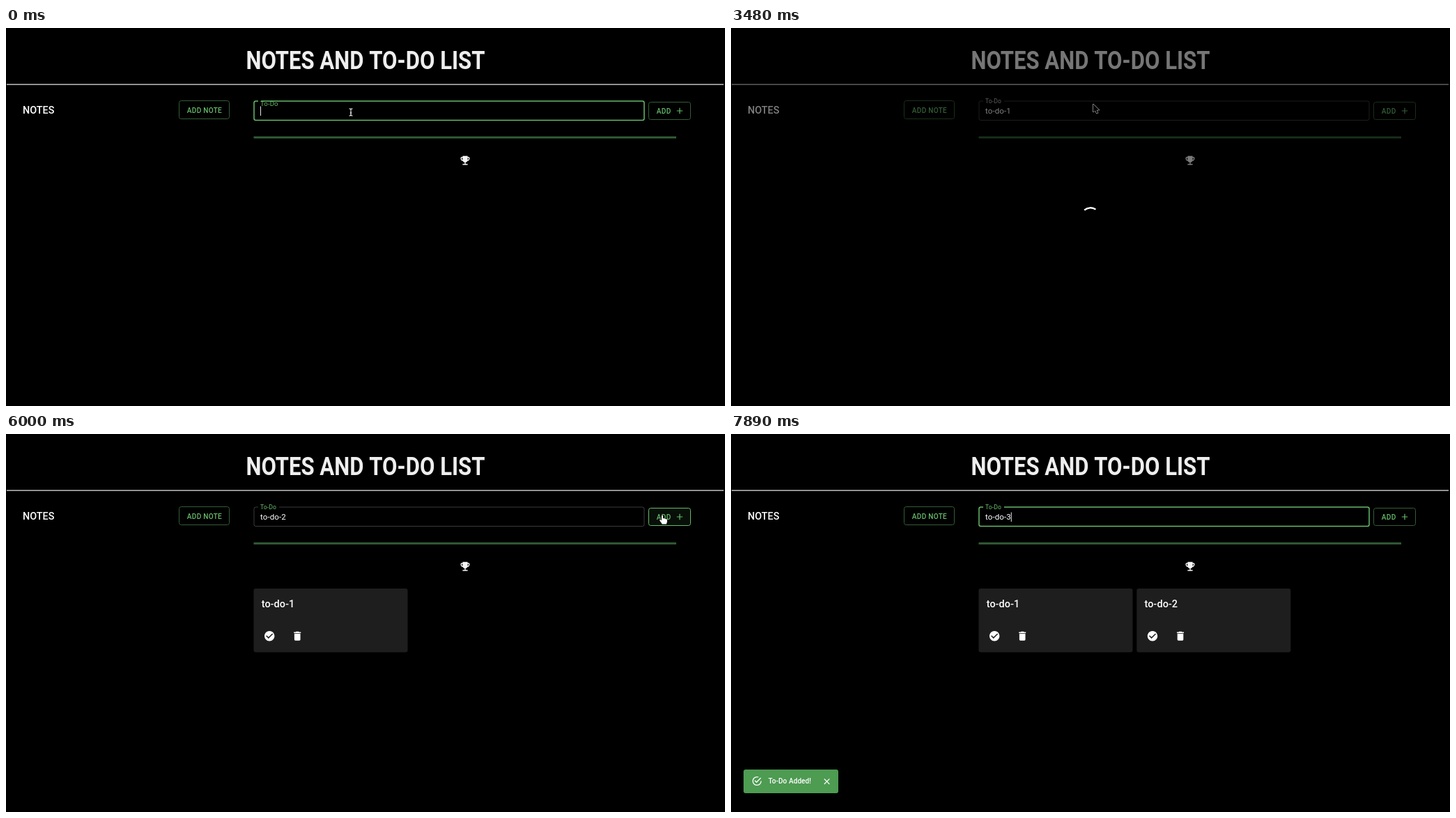
These frames come from a looping animation (1032x543 px, 8 s). An HTML page with a canvas:

```html
<!DOCTYPE html>
<html lang="en">
<head>
<meta charset="utf-8">
<title>Notes and to-do list</title>
<style>
  html, body { margin: 0; width: 100%; height: 100%; overflow: hidden; background: #000; }
  canvas { display: block; }
</style>
</head>
<body>
<canvas id="stage" width="1032" height="543"></canvas>
<script>
const ctx = document.getElementById('stage').getContext('2d');
const LOOP = 8000, GREEN = '#66bb6a', DARK_GREEN = '#335d35';

const ICONS = {
  trophy: 'M19 5h-2V3H7v2H5c-1.1 0-2 .9-2 2v1c0 2.55 1.92 4.63 4.39 4.94.63 1.5 1.98 2.63 3.61 2.96V19H7v2h10v-2h-4v-3.1c1.63-.33 2.98-1.46 3.61-2.96C19.08 12.63 21 10.55 21 8V7c0-1.1-.9-2-2-2zM5 8V7h2v3.82C5.84 10.4 5 9.3 5 8zm14 0c0 1.3-.84 2.4-2 2.82V7h2v1z',
  done: 'M12 2C6.48 2 2 6.48 2 12s4.48 10 10 10 10-4.48 10-10S17.52 2 12 2zm-2 15l-5-5 1.41-1.41L10 14.17l7.59-7.59L19 8l-9 9z',
  bin: 'M6 19c0 1.1.9 2 2 2h8c1.1 0 2-.9 2-2V7H6v12zM19 4h-3.5l-1-1h-5l-1 1H5v2h14V4z',
  plus: 'M19 13h-6v6h-2v-6H5v-2h6V5h2v6h6v2z',
  close: 'M19 6.41L17.59 5 12 10.59 6.41 5 5 6.41 10.59 12 5 17.59 6.41 19 12 13.41 17.59 19 19 17.59 13.41 12z',
  success: 'M20 12A8 8 0 1 1 12 4C12.76 4 13.5 4.11 14.2 4.31L15.77 2.74C14.61 2.26 13.34 2 12 2A10 10 0 1 0 22 12M7.91 10.08L6.5 11.5 11 16 21 6 19.59 4.58 11 13.17z'
};
for (const name in ICONS) ICONS[name] = new Path2D(ICONS[name]);

const ARROW = new Path2D('M0 0V12L2.8 9.5 4.8 14 6.8 13 4.9 8.8H8.6z');
const HAND = new Path2D('M-1 1C-1-.5 1-.5 1 1V4.5C2 3.8 3 4 3.2 4.8 4.2 4.2 5 4.5 5.2 5.4 6.4 5 7 5.6 7 6.6V9C7 10 6 11 6 12.5H-.5C-.5 11-2 10-3.6 7.4-4.3 6.2-2.8 5.4-1.8 6.6L-1 7.4z');
const IBEAM = new Path2D('M-2.5-5H-1L0-4 1-5H2.5M0-4V4M-2.5 5H-1L0 4 1 5H2.5M-1.3 1H1.3');

// [time, field content]
const TYPING = [[0, ''], [810, 't'], [900, 'to'], [990, 'to-'], [1050, 'to-d'], [1140, 'to-do'],
  [1740, 'to-do-'], [1860, 'to-do-1'], [5100, 'to-do-'], [5250, 'to-do-2'],
  [7590, 'to-do-'], [7770, 'to-do-3']];

// [time, x, y] of the pointer's hot spot
const POINTER = [[0, 495, 121], [2070, 495, 121], [2550, 961, 120], [2900, 961, 120], [3400, 520, 109],
  [4500, 520, 109], [4690, 491, 118], [5430, 491, 118], [5850, 942, 117], [6000, 942, 117],
  [6480, 510, 113], [LOOP, 510, 113]];

const within = (t, ...spans) => spans.some(([a, b]) => t >= a && t < b);
const ramp = (t, start, length) => Math.max(0, Math.min(1, (t - start) / length));
const smooth = x => x * x * (3 - 2 * x);
const fade = (t, start, end) => smooth(ramp(t, start, 225)) * (1 - smooth(ramp(t, end, 195)));

function text(str, x, y, size, weight, color, spacing = 0) {
  ctx.font = `${weight} ${size}px Roboto, sans-serif`;
  ctx.letterSpacing = spacing + 'px';
  ctx.fillStyle = color;
  ctx.fillText(str, x, y);
}

function icon(name, x, y, scale, color = '#fff') {
  ctx.save();
  ctx.translate(x, y);
  ctx.scale(scale, scale);
  ctx.translate(-12, -12);
  ctx.fillStyle = color;
  ctx.fill(ICONS[name]);
  ctx.restore();
}

function box(x, y, w, h, fill, stroke) {
  ctx.beginPath();
  ctx.roundRect(x, y, w, h, 2.9);
  if (fill) { ctx.fillStyle = fill; ctx.fill(); }
  if (stroke) { ctx.strokeStyle = stroke; ctx.lineWidth = 1; ctx.stroke(); }
}

function header() {
  ctx.save();
  ctx.translate(516, 59.3);
  ctx.scale(.83, 1);
  ctx.textAlign = 'center';
  text('NOTES AND TO-DO LIST', 0, 0, 37.5, 700, '#eee');
  ctx.restore();
  ctx.fillStyle = '#ccc';
  ctx.fillRect(1, 80.4, 1029, 1.4);
  text('NOTES', 24, 122.6, 14.4, 500, '#fff', .1);
  box(248.5, 104.5, 72, 26, null, DARK_GREEN);
  text('ADD NOTE', 259.8, 121.5, 10.08, 500, GREEN, .29);
}

function field(t, hovered) {
  const focused = within(t, [0, 2880], [4800, 5940], [7380, LOOP]);
  const labelGreen = focused || within(t, [2880, 3000], [5940, 6080]);
  const shrink = ramp(t, 480, 120);
  const gapEnd = 366 + 26 * shrink;
  ctx.beginPath();
  ctx.moveTo(gapEnd, 105);
  ctx.arcTo(916, 105, 916, 132.5, 2.5);
  ctx.arcTo(916, 132.5, 356, 132.5, 2.5);
  ctx.arcTo(356, 132.5, 356, 105, 2.5);
  ctx.arcTo(356, 105, 362, 105, 2.5);
  ctx.lineTo(362, 105);
  ctx.strokeStyle = focused ? GREEN : hovered ? '#fff' : 'rgba(255,255,255,.23)';
  ctx.lineWidth = focused ? 1.5 : 1;
  ctx.stroke();
  text('To-Do', 365, 112.4 - 4.6 * shrink, 9.6 - .96 * shrink, 400, labelGreen ? GREEN : '#b8b8b8', .1);

  const value = TYPING.findLast(([start]) => t >= start)[1];
  text(value, 365, 123, 11.52, 400, '#fff', .1);
  if (within(t, [0, 2360], [4830, 5700], [7410, LOOP])) {
    ctx.fillRect(365 + ctx.measureText(value).width, 112.5, .9, 13.5);
  }
}

function addButton(hovered) {
  box(922.5, 106.5, 60, 25, hovered && 'rgba(102,187,106,.08)', hovered ? GREEN : DARK_GREEN);
  text('ADD', 933.8, 122.7, 10.08, 500, GREEN, .29);
  icon('plus', 967, 119, .6, GREEN);
}

function card(x, title) {
  box(x, 222, 221, 91.5, '#1e1e1e');
  text(title, x + 11.3, 249.4, 14.4, 500, '#fff', .1);
  icon('done', x + 22.7, 290.3, .72);
  icon('bin', x + 62.7, 290.3, .72);
}

// Dashed circle that grows, then shrinks, while the whole ring turns.
function spinner(elapsed) {
  const p = elapsed / 1400 % 1, round = 126.9;
  const grow = smooth(ramp(p, 0, .5)), slide = smooth(ramp(p, .5, .5));
  const from = 15 * grow + 110 * slide;
  const to = Math.min(round, from + 1 + 99 * grow);
  const angle = dash => (p + dash / round) * 2 * Math.PI;
  ctx.beginPath();
  ctx.arc(516, 271.5, 13.2, angle(from), angle(to));
  ctx.strokeStyle = '#fff';
  ctx.lineWidth = 2.4;
  ctx.stroke();
}

function snackbar(amount) {
  if (!amount) return;
  const s = .75 + .25 * amount;
  ctx.save();
  ctx.globalAlpha = amount;
  ctx.translate(86, 499);
  ctx.scale(s, s * s);
  ctx.translate(-86, -499);
  box(18, 482, 136, 34, '#4e9b52');
  icon('success', 37.3, 498.5, .66);
  text('To-Do Added!', 53.6, 502.2, 10.08, 500, '#fff', .05);
  icon('close', 137.6, 499.2, .6);
  ctx.restore();
}

function pointerAt(t) {
  const i = POINTER.findIndex(([end]) => end > t);
  const [t0, x0, y0] = POINTER[i - 1], [t1, x1, y1] = POINTER[i];
  const k = smooth((t - t0) / (t1 - t0));
  return [x0 + (x1 - x0) * k, y0 + (y1 - y0) * k];
}

function drawPointer(x, y, kind) {
  ctx.save();
  ctx.translate(x, y);
  if (kind === 'ibeam') {
    ctx.strokeStyle = '#000';
    ctx.lineWidth = 3;
    ctx.stroke(IBEAM);
    ctx.strokeStyle = '#fff';
    ctx.lineWidth = 1.1;
    ctx.stroke(IBEAM);
  } else {
    const isHand = kind === 'hand', shape = isHand ? HAND : ARROW;
    ctx.fillStyle = isHand ? '#fff' : '#000';
    ctx.strokeStyle = isHand ? '#000' : '#fff';
    ctx.lineWidth = 1;
    ctx.stroke(shape);
    ctx.fill(shape);
  }
  ctx.restore();
}

function draw(t) {
  const [x, y] = pointerAt(t);
  const visible = !within(t, [840, 2070], [5100, 5430], [7530, LOOP]);
  const shade = fade(t, 3000, 3930) + fade(t, 6100, 7000);
  const kind = shade ? 'arrow' : x > 921 ? 'hand' : 'ibeam';

  ctx.fillStyle = '#000';
  ctx.fillRect(0, 0, 1032, 543);
  header();
  field(t, visible && kind === 'ibeam' && within(t, [3930, 4800], [7000, 7380]));
  addButton(visible && kind === 'hand');
  ctx.fillStyle = DARK_GREEN;
  ctx.fillRect(355.5, 155.7, 606.5, 2.9);
  icon('trophy', 659, 190.3, .72, '#f4f4f4');
  if (t >= 3930) card(355.5, 'to-do-1');
  if (t >= 7000) card(582.3, 'to-do-2');

  if (shade) {
    ctx.fillStyle = `rgba(0,0,0,${shade / 2})`;
    ctx.fillRect(0, 0, 1032, 543);
    ctx.globalAlpha = shade;
    spinner(t - (t < 5000 ? 2297 : 6100 + 40));
    ctx.globalAlpha = 1;
  }
  snackbar(fade(t, 3930, 5600) + fade(t, 7000, LOOP));
  if (visible) drawPointer(x, y, kind);
}

function tick() {
  draw(performance.now() % LOOP);
  requestAnimationFrame(tick);
}
tick();
</script>
</body>
</html>
```
